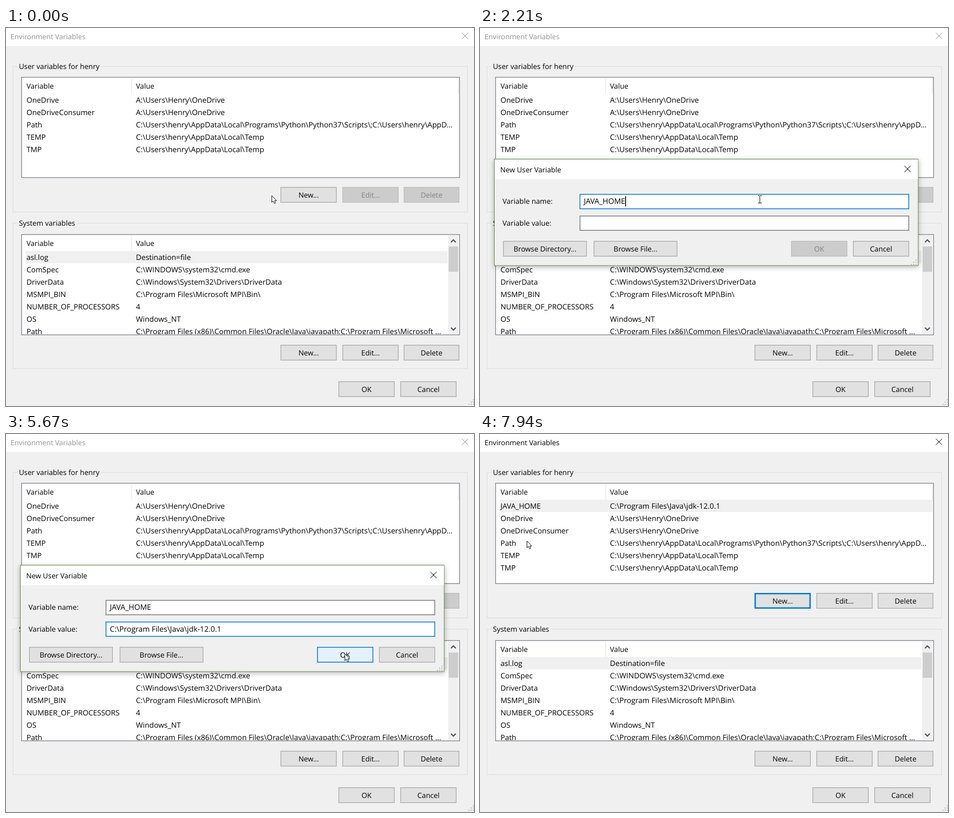
Animation, 832 px wide and 673 px high, one loop 8 s. Source, as an HTML page with a canvas:

```html
<!DOCTYPE html>
<html lang="en">
<head>
<meta charset="utf-8">
<title>Environment Variables</title>
<style>
  html, body { margin: 0; width: 100%; height: 100%; overflow: hidden; background: #f0f0f0; }
  canvas { display: block; }
</style>
</head>
<body>
<canvas id="stage" width="832" height="673"></canvas>
<script>
const WIDTH = 832, HEIGHT = 673, LOOP = 8000;
const BLUE = '#0078d7', INK = '#000', FACE = '#f0f0f0';
const stage = document.getElementById('stage').getContext('2d');
const layer = document.createElement('canvas');
layer.width = WIDTH;
layer.height = HEIGHT;
const dialog = layer.getContext('2d');
let ctx = stage;

const userVariables = [
  ['OneDrive', 'A:\\Users\\Henry\\OneDrive'],
  ['OneDriveConsumer', 'A:\\Users\\Henry\\OneDrive'],
  ['Path', 'C:\\Users\\henry\\AppData\\Local\\Programs\\Python\\Python37\\Scripts\\;C:\\Users\\henry\\AppD...'],
  ['TEMP', 'C:\\Users\\henry\\AppData\\Local\\Temp'],
  ['TMP', 'C:\\Users\\henry\\AppData\\Local\\Temp']
];
const systemVariables = [
  ['asl.log', 'Destination=file'],
  ['ComSpec', 'C:\\WINDOWS\\system32\\cmd.exe'],
  ['DriverData', 'C:\\Windows\\System32\\Drivers\\DriverData'],
  ['MSMPI_BIN', 'C:\\Program Files\\Microsoft MPI\\Bin\\'],
  ['NUMBER_OF_PROCESSORS', '4'],
  ['OS', 'Windows_NT'],
  ['Path', 'C:\\Program Files (x86)\\Common Files\\Oracle\\Java\\javapath;C:\\Program Files\\Microsoft ...']
];
const newVariable = ['JAVA_HOME', 'C:\\Program Files\\Java\\jdk-12.0.1'];

// Keyframes: [time, ...values]
const pointerPath = [
  [60, 472, 298], [320, 532, 290], [1000, 532, 290], [1090, 499, 298],
  [2200, 499, 303], [2440, 457, 345], [2510, 457, 345], [2780, 307, 348],
  [3130, 307, 348], [4450, 387, 357], [4660, 387, 357], [4750, 423, 355],
  [4820, 423, 355], [5560, 602, 391], [6600, 602, 391], [6860, 655, 564],
  [6960, 655, 564], [7400, 315, 291], [7460, 315, 291], [7700, 88, 200],
  [7860, 88, 200], [7930, 83, 190]
];
const nameTyping = [[1240, 0], [1550, 4], [1710, 5], [1790, 5], [2110, 9]];
const valueTyping = [[3100, 0], [3590, 19], [3920, 19], [4480, 32]];

const between = (t, start, end) => t >= start && t < end;
const clamp = v => Math.max(0, Math.min(1, v));

function track(keys, t) {
  const next = keys.findIndex(key => key[0] > t);
  if (next === 0) return keys[0].slice(1);
  if (next < 0) return keys[keys.length - 1].slice(1);
  const a = keys[next - 1], b = keys[next];
  const p = (t - a[0]) / (b[0] - a[0]);
  return a.slice(1).map((v, i) => v + (b[i + 1] - v) * p);
}

function fill(x, y, w, h, color) {
  ctx.fillStyle = color;
  ctx.fillRect(x, y, w, h);
}

function box(x, y, w, h, color, border, line = 1) {
  fill(x, y, w, h, border);
  fill(x + line, y + line, w - 2 * line, h - 2 * line, color);
}

function text(string, x, y, size = 12.8, color = INK, align = 'left') {
  ctx.font = `${size}px "Open Sans", "Noto Sans", sans-serif`;
  ctx.textRendering = 'geometricPrecision';
  ctx.textAlign = align;
  ctx.fillStyle = color;
  ctx.fillText(string, x, y);
}

function polyline(points, color, width = 1) {
  ctx.beginPath();
  points.forEach(([x, y]) => ctx.lineTo(x, y));
  ctx.strokeStyle = color;
  ctx.lineWidth = width;
  ctx.stroke();
}

function closeCross(x, y, color) {
  polyline([[x, y], [x + 11, y + 11]], color);
  polyline([[x, y + 11], [x + 11, y]], color);
}

function grip(right, bottom) {
  for (let row = 0; row < 3; row++)
    for (let col = 0; col <= row; col++)
      fill(right - 2 - col * 4, bottom - 10 + row * 4, 2, 2, '#bdbdbd');
}

const buttonStyles = {
  normal: ['#e1e1e1', '#adadad', 1.3],
  disabled: ['#cccccc', '#bfbfbf', 1.3],
  focus: ['#e1e1e1', BLUE, 2.4],
  hover: ['#e5f1fb', BLUE, 1.4],
  pressed: ['#cce4f7', '#005499', 1.4]
};

function button(label, x, y, w = 100, state = 'normal') {
  box(x, y, w, 28, ...buttonStyles[state]);
  text(label, x + w / 2, y + 18.5, 12.8, state === 'disabled' ? '#838383' : INK, 'center');
}

function group(label, y, labelWidth) {
  ctx.strokeStyle = '#dcdcdc';
  ctx.lineWidth = 1;
  ctx.strokeRect(12.5, y + .5, 808, 259);
  fill(20, y - 2, labelWidth, 5, FACE);
  text(label, 23, y + 5);
}

function list(y, rows, selected, right) {
  box(27, y, 780, 180, '#fff', '#828790', 1.3);
  fill(223, y + 1, 1, 29, '#e5e5e5');
  text('Variable', 36.5, y + 20.5);
  text('Value', 231, y + 20.5);
  ctx.save();
  ctx.beginPath();
  ctx.rect(28, y + 1, 778, 177);
  ctx.clip();
  rows.forEach(([name, value], i) => {
    const top = y + 30 + i * 22;
    if (i === selected) fill(35, top, right - 35, 22, FACE);
    text(name, 36.5, top + 16, 13.1);
    text(value, 231, top + 16, 13.3);
  });
  ctx.restore();
}

function scrollbar() {
  fill(786, 369, 18, 176, FACE);
  fill(787, 389, 17, 45, '#cdcdcd');
  polyline([[791, 381.5], [795.3, 377.2], [799.6, 381.5]], '#505050', 2);
  polyline([[791, 533.5], [795.3, 537.8], [799.6, 533.5]], '#505050', 2);
}

function drawWindow(t) {
  const active = between(t, 470, 620) || t >= 5980;
  const added = t >= 6100;
  const titleColor = active ? INK : '#929292';
  fill(0, 0, WIDTH, HEIGHT, FACE);
  fill(0, 0, WIDTH, 32, '#fff');
  text('Environment Variables', 8, 20, 12.7, titleColor);
  closeCross(810.5, 8.5, titleColor);

  group('User variables for henry', 68, 148);
  list(87, added ? [newVariable, ...userVariables] : userVariables, added ? 0 : -1, 804);
  fill(804, 88, 1, 29, '#e5e5e5');
  let newState = 'normal';
  if (between(t, 160, 470)) newState = 'hover';
  else if (between(t, 470, 550)) newState = 'pressed';
  else if (t >= 550) newState = 'focus';
  button('New...', 488, 283, 100, newState);
  button('Edit...', 598, 283, 100, added ? 'normal' : 'disabled');
  button('Delete', 707, 283, 99, added ? 'normal' : 'disabled');

  group('System variables', 347, 108);
  list(367, systemVariables, 0, 785);
  scrollbar();
  button('New...', 488, 564);
  button('Edit...', 598, 564);
  button('Delete', 707, 564, 99);
  button('OK', 591, 629);
  button('Cancel', 701, 629);
  grip(832, 671);
}

function field(content, y, focused, caret, hovered) {
  box(177, y, 586, 27, '#fff', focused ? BLUE : hovered ? '#171717' : '#7a7a7a', 1.4);
  text(content, 184.5, y + 17.5, 13.45);
  if (caret) fill(Math.round(184.5 + ctx.measureText(content).width), y + 4, 1.5, 18, '#000');
}

function drawDialog(t) {
  ctx.clearRect(0, 0, WIDTH, HEIGHT);
  ctx.shadowColor = 'rgba(0,0,0,.28)';
  ctx.shadowBlur = 9;
  ctx.shadowOffsetY = 2;
  fill(25, 233, 754.5, 190.5, '#6f8a56');
  ctx.shadowColor = 'transparent';
  fill(26, 234, 752.5, 188.5, FACE);
  fill(26, 234, 752.5, 35, '#fff');
  text('New User Variable', 36, 256.5, 12.7);
  closeCross(754.5, 245.5, INK);

  const onValue = t >= 2800;
  const [nameCount] = track(nameTyping, t);
  const [valueCount] = track(valueTyping, t);
  const valueCaret = between(t, 2830, 3050) || between(t, 3130, 4850) || between(t, 5130, 5560);
  text('Variable name:', 40, 313);
  text('Variable value:', 40, 352);
  field(newVariable[0].slice(0, Math.floor(nameCount)), 295.5, !onValue, !onValue);
  field(newVariable[1].slice(0, Math.floor(valueCount)), 334, onValue, valueCaret, t >= 2390);

  let okState = 'disabled';
  if (between(t, 5600, 5670)) okState = 'pressed';
  else if (t >= 5380) okState = 'hover';
  else if (valueCount >= 1) okState = 'focus';
  button('Browse Directory...', 41, 379, 149);
  button('Browse File...', 202, 379, 149);
  button('OK', 553, 379, 100, okState);
  button('Cancel', 663, 379);
  grip(776, 422);
}

function drawPointer(t) {
  if (between(t, 1320, 2180) || between(t, 3130, 4400)) return;
  const [x, y] = track(pointerPath, t).map(Math.round);
  if (between(t, 1050, 3130)) {
    fill(x, y - 6, 1, 13, '#222');
    for (const end of [-7, 6]) {
      fill(x - 3, y + end, 3, 1, '#222');
      fill(x + 1, y + end, 3, 1, '#222');
    }
    return;
  }
  ctx.beginPath();
  for (const [dx, dy] of [[0, 0], [0, 12], [2.7, 9.6], [4.7, 14], [6.8, 13], [4.9, 9], [8.5, 9]])
    ctx.lineTo(x + dx + .5, y + dy + .5);
  ctx.closePath();
  ctx.fillStyle = '#fff';
  ctx.fill();
  ctx.strokeStyle = '#222';
  ctx.lineWidth = 1;
  ctx.stroke();
}

function draw(t) {
  ctx = stage;
  drawWindow(t);
  const opacity = clamp((t - 600) / 240) * clamp((6120 - t) / 200);
  if (opacity > 0) {
    ctx = dialog;
    drawDialog(t);
    ctx = stage;
    const scale = .92 + .08 * opacity;
    ctx.save();
    ctx.globalAlpha = opacity;
    ctx.translate(402 * (1 - scale), 328 * (1 - scale));
    ctx.scale(scale, scale);
    ctx.drawImage(layer, 0, 0);
    ctx.restore();
  }
  drawPointer(t);
}

const start = performance.now();
function tick() {
  draw((performance.now() - start) % LOOP);
  requestAnimationFrame(tick);
}
tick();
</script>
</body>
</html>
```
